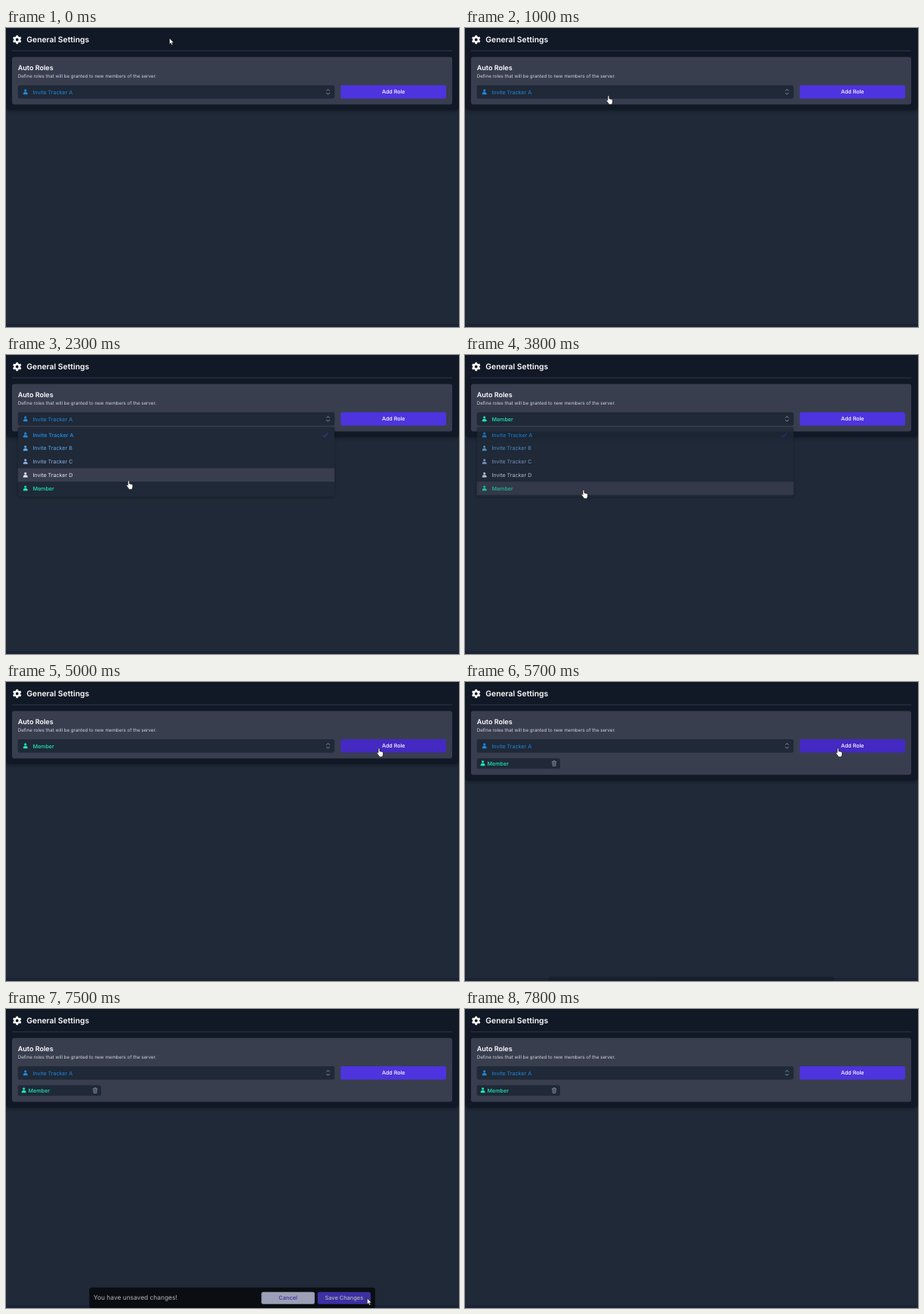
An HTML page for the animation above (9000 ms loop, 600x397 px).

```html
<!DOCTYPE html>
<html lang="en">
<head>
<meta charset="utf-8">
<title>General Settings</title>
<style>
  html, body { margin: 0; width: 100%; height: 100%; overflow: hidden; background: #1f2937; }
  svg { display: block; width: 600px; height: 397px; }
  text { font: 400 7.15px Inter, "Open Sans", sans-serif; fill: #fff; text-rendering: geometricPrecision; }
  .mid { text-anchor: middle; font-weight: 500; }
  #panel { fill: #111826; filter: drop-shadow(0 1px 2px #0006); }
  #card { fill: #393e4f; }
  #menu { filter: drop-shadow(0 1px 1.5px #0005); }
  .field { fill: #1f2937; }
  .line { fill: none; stroke-linecap: round; stroke-linejoin: round; }
</style>
</head>
<body>
<svg viewBox="0 0 600 397">
  <defs>
    <g id="user">
      <circle cy="-2" r="1.55"/>
      <path d="M-2.9 3.3V2.2C-2.9.7-1.6.1 0 .1S2.9.7 2.9 2.2V3.3Z"/>
    </g>
  </defs>
  <rect width="600" height="397" fill="#1f2937"/>
  <rect y="393" width="600" height="4" fill="#1b2436"/>

  <rect id="panel" y="-8" width="600" rx="5"/>
  <g id="gear" transform="translate(14.7 15.5)" fill="#fff">
    <circle r="3.15" fill="none" stroke="#fff" stroke-width="2.5"/>
  </g>
  <text x="27.3" y="19" style="font-size:10.35px;font-weight:600">General Settings</text>
  <rect x="8" y="29.8" width="583" height=".8" fill="#374151"/>

  <rect id="card" x="8" y="38.5" width="583" rx="3"/>
  <text x="15.7" y="56" style="font-size:9.05px;font-weight:600">Auto Roles</text>
  <text x="15.7" y="66" style="font-size:6.18px;fill:#d0d3da">Define roles that will be granted to new members of the server.</text>

  <rect class="field" x="15.7" y="76" width="419.5" height="17.7" rx="2.5"/>
  <g id="choice"></g>
  <path class="line" d="M424.7 83.2l1.8-1.8 1.8 1.8M424.7 86.4l1.8 1.8 1.8-1.8" stroke="#9ca3af" stroke-width=".9"/>
  <rect id="add" x="443.3" y="76" width="139.7" height="17.7" rx="2.5"/>
  <text class="mid" x="513.2" y="87.4">Add Role</text>

  <g id="chip">
    <rect class="field" x="15.7" y="101.3" width="110.3" height="14" rx="2.5"/>
    <use href="#user" x="23.6" y="107.9" fill="#1de9b6"/>
    <text x="29.5" y="111" style="fill:#1de9b6;font-weight:500">Member</text>
    <path class="line" d="M115.3 106h5.6M116.9 105.8v-1h2.4v1M115.9 106.3l.4 5.2h3.6l.4-5.2M117.3 107.6v2.5M118.9 107.6v2.5" stroke="#8b909d" stroke-width=".8"/>
  </g>

  <g id="menu">
    <rect class="field" x="15.7" y="95.6" width="419.5" height="92.4" rx="2.5"/>
    <rect id="active" x="15.7" width="419.5" height="17.7" fill="#393e4f"/>
    <g id="rows"></g>
    <path class="line" d="M420 107l1.8 1.8 4-5" stroke="#4e34de" stroke-width="1"/>
  </g>

  <g id="toast">
    <rect x="110.3" y="354.6" width="378.7" height="27.6" rx="3"/>
    <text x="116" y="371.3" style="font-size:8.4px">You have unsaved changes!</text>
    <rect x="338.3" y="360.7" width="70.5" height="15.8" rx="2.5" fill="#e0e1fc"/>
    <text class="mid" x="373.6" y="371.2" style="font-size:7.4px;fill:#4e34de">Cancel</text>
    <rect id="save" x="412.7" y="360.7" width="70.3" height="15.8" rx="2.5"/>
    <text class="mid" x="447.8" y="371.2" style="font-size:7.4px">Save Changes</text>
  </g>

  <g id="cursor" fill="#fff" stroke="#111" stroke-width=".7" stroke-linejoin="round">
    <path id="arrow" d="M0 0V8.4L1.9 6.7 3.2 9.7 4.7 9 3.4 6.2H5.9Z"/>
    <path id="hand" d="M-1 .9Q-1-.2 0-.2T1 .9V4Q2.2 3.5 2.8 4.4 4 4 4.3 4.9 5.6 4.7 5.6 6V8Q5.6 9.2 4.8 10.2V11.4H.2V10.4L-2.6 6.7Q-3.2 5.7-2.4 5.4-1.7 5.2-1 6.2Z"/>
  </g>
</svg>
<script>
const LOOP = 9000, STEP = 100;
const ROW_TOP = 97.3, ROW = 17.7;
const IDLE = '#4e34de', HOVER = '#4429c2';
const $ = id => document.getElementById(id);

const roles = [
  ['Invite Tracker A', '#2187de'],
  ['Invite Tracker B', '#5ea8ea'],
  ['Invite Tracker C', '#94b0e4'],
  ['Invite Tracker D', '#e6e7ef'],
  ['Member', '#1de9b6']
];

// time, x, y of the pointer tip
const path = [
  [0, 216.4, 13.3], [400, 216.4, 13.3], [1000, 190, 90], [1800, 190, 90],
  [2000, 181.7, 125], [2300, 162.3, 167], [2500, 157, 179.3], [4400, 157, 179.3],
  [5000, 494, 88], [5800, 494, 88], [6400, 479.8, 353], [6600, 479.5, 365.5],
  [7300, 479.5, 365.5], [7700, 477, 402], [LOOP, 477, 402]
];

const roleMarkup = ([name, color], y, weight) =>
  `<use href="#user" x="25.7" y="${y}" fill="${color}"/>` +
  `<text x="35.4" y="${y + 2.6}" style="fill:${color};font-weight:${weight}">${name}</text>`;

const rowMid = i => ROW_TOP + ROW * (i + .5);
$('rows').innerHTML = roles.map((r, i) =>
  roleMarkup(r, rowMid(i), i === 0 ? 600 : i === 4 ? 500 : 400)).join('');
for (let a = 0; a < 360; a += 60)
  $('gear').insertAdjacentHTML('beforeend',
    `<path d="M-1.7-3.6L-1.2-5.8H1.2L1.7-3.6Z" transform="rotate(${a})"/>`);

const clamp = v => Math.max(0, Math.min(1, v));
const ramp = (t, from, to) => clamp((t - from) / (to - from));
const smooth = v => v * v * (3 - 2 * v);
const show = (id, on) => $(id).style.display = on ? '' : 'none';

function pointer(t) {
  const i = path.findIndex(p => p[0] > t);
  const [t0, x0, y0] = path[i - 1], [t1, x1, y1] = path[i];
  const linear = t0 >= 1800 && t0 < 2500;
  const k = linear ? ramp(t, t0, t1) : smooth(ramp(t, t0, t1));
  return [x0 + (x1 - x0) * k, y0 + (y1 - y0) * k];
}

let shown = -1;
function setChoice(i) {
  if (i === shown) return;
  shown = i;
  $('choice').innerHTML = roleMarkup(roles[i], 84.9, i === 4 ? 500 : 400);
}

function draw(t) {
  const [x, y] = pointer(t);
  const inside = (l, top, r, b) => x >= l && x <= r && y >= top && y <= b;
  const added = t >= 5700;

  $('panel').setAttribute('height', added ? 139 : 117);
  $('card').setAttribute('height', added ? 84.7 : 63);
  show('chip', added);
  setChoice(t >= 3800 && !added ? 4 : 0);

  const open = t >= 1600 && t < 4000;
  const row = t < 1900 ? 0 : Math.floor((y - ROW_TOP) / ROW);
  show('menu', open);
  $('menu').style.opacity = t < 1700 ? .85 : t < 3800 ? 1 : t < 3900 ? .77 : .3;
  show('active', row >= 0 && row < 5);
  $('active').setAttribute('y', ROW_TOP + ROW * row);

  const rise = smooth(ramp(t, 5600, 6000)) * (1 - smooth(ramp(t, 7300, 7800)));
  show('toast', rise > 0);
  $('toast').setAttribute('transform', `translate(0 ${(1 - rise) * 43})`);
  $('toast').style.opacity = rise;

  const onAdd = inside(443.3, 76, 583, 93.7);
  const onSave = rise > .9 && inside(412.7, 360.7, 483, 376.5);
  $('add').setAttribute('fill', onAdd ? HOVER : IDLE);
  $('save').setAttribute('fill', onSave ? HOVER : IDLE);

  const hand = onAdd || onSave || inside(15.7, 76, 435.2, 93.7) ||
    open && inside(15.7, ROW_TOP, 435.2, 186);
  show('hand', hand);
  show('arrow', !hand);
  $('cursor').setAttribute('transform', `translate(${x} ${y})`);
}

const start = performance.now();
function tick(now) {
  const t = Math.max(0, now - start) % LOOP;
  draw(Math.floor(t / STEP) * STEP);
  requestAnimationFrame(tick);
}
draw(0);
requestAnimationFrame(tick);
</script>
</body>
</html>
```
